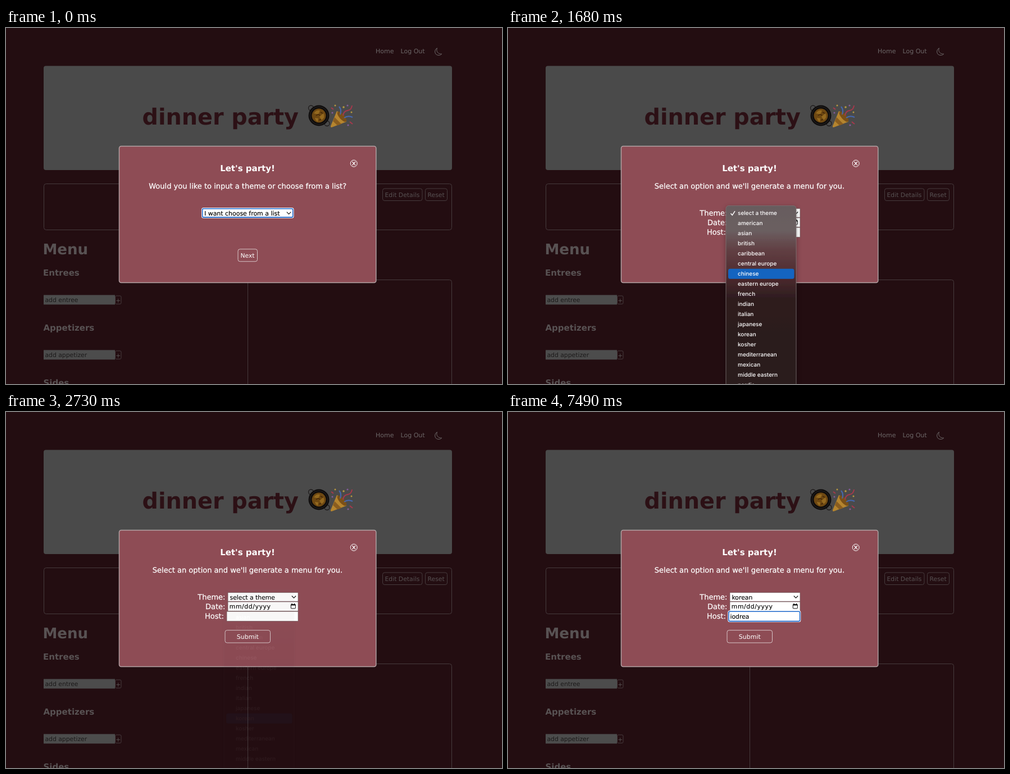
Write an HTML page that moves like this. It is 883 by 634 pixels and loops after 8000 ms.

```html
<!DOCTYPE html>
<html lang="en">
<head>
<meta charset="utf-8">
<title>dinner party</title>
<style>
  html, body { margin: 0; width: 100%; height: 100%; overflow: hidden; background: #230d11; }
  svg { display: block; width: 883px; height: 634px; font: 10.8px "DejaVu Sans", Verdana, sans-serif; text-rendering: geometricPrecision; }
  .bold { font-weight: bold; }
  .mid { text-anchor: middle; }
  .end { text-anchor: end; }
  .line { fill: none; stroke: #463b3d; }
  .page { fill: #585253; }
  .nav { fill: #6c6667; }
  .head { font-size: 15px; }
  .copy { font-size: 13px; stroke: #fff; stroke-width: .25; }
  .input { fill: #fff; stroke: #6f5a5d; stroke-width: .7; }
  .ink { fill: #000; stroke: #000; stroke-width: .15; }
  .list { font: 500 10px Inter, Roboto, sans-serif; fill: #fff; }

  .ask, .form, .menu, .bar, .before, .after, .focus, .typed, .caret, .caret rect {
    animation: 8s step-end infinite;
  }
  .ask { animation-name: ask; }
  .form { animation-name: form; }
  .menu { animation-name: menu; }
  .bar { animation-name: bar; }
  .before { animation-name: before; }
  .after { animation-name: after; }
  .focus { animation-name: focus; }
  .typed { animation-name: type; }
  .caret { animation-name: move; }
  .caret rect { animation-name: blink; }

  @keyframes ask { 0% { opacity: 1 } .875%, 100% { opacity: 0 } }
  @keyframes form { 0% { opacity: 0 } .875%, 100% { opacity: 1 } }
  @keyframes menu {
    0% { opacity: 0 }
    14% { opacity: 1 }
    31.5% { opacity: .94 }
    32.375% { opacity: .65 }
    33.25% { opacity: .3 }
    34.125% { opacity: .05 }
    35%, 100% { opacity: 0 }
  }
  /* one list row is 18px high */
  @keyframes bar {
    0% { transform: none; opacity: 1 }
    19.25% { transform: translateY(36px) }
    20.125% { transform: translateY(72px) }
    21% { transform: translateY(108px) }
    21.875% { transform: translateY(162px) }
    22.75% { transform: translateY(198px) }
    26.25% { transform: translateY(216px); opacity: 1 }
    29.75% { transform: translateY(216px); opacity: 0 }
    30.625%, 100% { transform: translateY(216px); opacity: 1 }
  }
  @keyframes before { 0% { opacity: 1 } 35%, 100% { opacity: 0 } }
  @keyframes after { 0% { opacity: 0 } 35%, 100% { opacity: 1 } }
  @keyframes focus { 0% { opacity: 0 } 46.375%, 100% { opacity: 1 } }
  @keyframes type {
    0% { clip-path: inset(-5px 100% -5px 0) }
    51.625% { clip-path: inset(-5px 31.2px -5px 0) }
    52.5% { clip-path: inset(-5px 24.6px -5px 0) }
    55.125% { clip-path: inset(-5px 17.7px -5px 0) }
    56.875% { clip-path: inset(-5px 13.3px -5px 0) }
    57.75% { clip-path: inset(-5px 6.6px -5px 0) }
    59.5%, 100% { clip-path: inset(-5px) }
  }
  @keyframes move {
    0% { transform: none }
    51.625% { transform: translateX(3px) }
    52.5% { transform: translateX(9.6px) }
    55.125% { transform: translateX(16.5px) }
    56.875% { transform: translateX(20.9px) }
    57.75% { transform: translateX(27.6px) }
    59.5% { transform: translateX(34.2px) }
    87.5%, 100% { transform: translateX(37.6px) }
  }
  @keyframes blink {
    0% { opacity: 1 }
    65.625% { opacity: 0 }
    72.625% { opacity: 1 }
    78.75% { opacity: 0 }
    85.75% { opacity: 1 }
    93.625%, 100% { opacity: 0 }
  }
</style>
</head>
<body>
<svg viewBox="0 0 883 634">
  <defs>
    <linearGradient id="glass" gradientUnits="userSpaceOnUse" x1="0" y1="316" x2="0" y2="634">
      <stop offset="0" stop-color="#665c5d"/>
      <stop offset=".14" stop-color="#6b5f61"/>
      <stop offset=".25" stop-color="#613f43"/>
      <stop offset=".4" stop-color="#4d2a2e"/>
      <stop offset=".52" stop-color="#2e1d1f"/>
      <stop offset="1" stop-color="#291c1d"/>
    </linearGradient>
    <filter id="shade" x="-20%" y="-10%" width="140%" height="120%">
      <feDropShadow dx="0" dy="3" stdDeviation="4" flood-opacity=".35"/>
    </filter>
    <path id="chevron" d="M-3.7-1.8 0 1.9 3.7-1.8" fill="none" stroke="#111" stroke-width="1.1"/>
  </defs>

  <rect width="883" height="634" fill="#230d11"/>

  <!-- navigation and banner -->
  <g class="nav" font-size="11">
    <text x="658" y="45">Home</text>
    <text x="702.5" y="45">Log Out</text>
  </g>
  <path d="M767.5 35.8C762 38.500 762 48.200 770 48.500 772.600 48.500 774.600 47.700 775.800 46.200 768.500 46.500 765.200 41 767.500 35.800Z" fill="none" stroke="#6c6667"/>
  <rect x="67" y="67.500" width="727" height="185.500" rx="4" fill="#4a4a4a"/>
  <text class="bold" x="242.500" y="171.500" font-size="39.700" fill="#2c1015">dinner party</text>

  <!-- pan -->
  <g fill="none" stroke="#1f1c1c" stroke-width="1.300">
    <circle cx="543" cy="142.500" r="4.500"/>
    <circle cx="571.500" cy="170" r="4.500"/>
  </g>
  <circle cx="557" cy="156" r="18.500" fill="#0e0c0c"/>
  <circle cx="557" cy="156" r="15.800" fill="none" stroke="#2a2625"/>
  <circle cx="557" cy="156" r="12.500" fill="#6e4812"/>
  <path d="M548 152q5-7 11-5l-3 7zM558 158l7-6q4 7-3 12zM550 160l6 1-1 6q-4-2-5-7z" fill="#94691f"/>
  <path d="M552 156q4-4 7 0M560 150l4 2M557 164l4-1" stroke="#452808" stroke-width="1.500" fill="none"/>

  <!-- popper -->
  <path d="M578 174.500 589 148Q605 155 606 167L581 176.500Q577 178 578 174.500Z" fill="#b5852f"/>
  <path d="M585 159 597 171 590 173.500 582 166Z" fill="#8a5d1f"/>
  <ellipse cx="598" cy="158" rx="4.500" ry="11.500" transform="rotate(-42 598 158)" fill="#7a5018"/>
  <g fill="none" stroke-width="2">
    <path d="M595 154q3-8-2-14" stroke="#4668b0"/>
    <path d="M600 156q1-8 8-9t8-9" stroke="#a8384c"/>
    <path d="M602 160q7-5 15-1" stroke="#4668b0"/>
    <path d="M579 142l4 3M612 167l5 4" stroke="#a8384c"/>
  </g>
  <g fill="#b59840">
    <circle cx="601" cy="141" r="1.800"/>
    <circle cx="615" cy="150" r="1.500"/>
    <circle cx="586" cy="138" r="1.500"/>
  </g>
  <g fill="#835a9c">
    <circle cx="608" cy="138" r="1.600"/>
    <circle cx="581" cy="151" r="1.500"/>
    <circle cx="609" cy="173" r="1.600"/>
  </g>

  <!-- page body -->
  <g class="line">
    <rect x="67.500" y="277.500" width="726" height="82" rx="4"/>
    <rect x="430.500" y="448.500" width="363" height="200" rx="4"/>
    <rect x="670.500" y="286" width="70.500" height="21.500" rx="3.500"/>
    <rect x="746.500" y="286" width="39" height="21.500" rx="3.500"/>
    <rect x="194.500" y="477" width="10.500" height="14.500" rx="2"/>
    <rect x="194.500" y="575" width="10.500" height="14.500" rx="2"/>
  </g>
  <g class="page">
    <text x="674.500" y="301">Edit Details</text>
    <text x="750.500" y="301">Reset</text>
    <text class="bold" x="65.500" y="403" font-size="26">Menu</text>
    <g class="bold head">
      <text x="66" y="441">Entrees</text>
      <text x="66.500" y="539">Appetizers</text>
      <text x="66.500" y="637">Sides</text>
    </g>
    <text class="mid" x="199.800" y="488.500">+</text>
    <text class="mid" x="199.800" y="586.500">+</text>
  </g>
  <g fill="#4c4c4c">
    <rect x="67" y="475.500" width="127" height="17"/>
    <rect x="67" y="573.500" width="127" height="17"/>
  </g>
  <g fill="#1c1a1a">
    <text x="69.500" y="488">add entree</text>
    <text x="69.500" y="586">add appetizer</text>
  </g>

  <!-- dialog -->
  <rect x="201.500" y="210.500" width="457.300" height="243" rx="3.500" fill="#8e4c55" stroke="#b3a3a5" stroke-width="1.500"/>
  <g fill="#fff">
    <text class="bold mid head" x="430" y="254.500">Let's party!</text>
    <circle cx="619.200" cy="241.200" r="6" fill="none" stroke="#fff"/>
    <path d="M616.500 238 622 244.400M622 238 616.500 244.400" stroke="#fff" stroke-width="1.200"/>
  </g>

  <g class="ask">
    <text class="mid copy" x="430.200" y="286" fill="#fff">Would you like to input a theme or choose from a list?</text>
    <rect x="348" y="320" width="164.500" height="18.800" rx="3.500" fill="#fff"/>
    <rect x="349.700" y="321.700" width="161" height="15.400" rx="2" fill="#fff" stroke="#1b66c9" stroke-width="1.600"/>
    <text class="ink" x="353" y="333.500" font-size="10.950">I want choose from a list</text>
    <use href="#chevron" x="503.500" y="329.500"/>
    <rect x="413" y="393.800" width="34.500" height="22" rx="3.500" fill="none" stroke="#d8c6c8"/>
    <text class="mid" x="430" y="409" fill="#fff">Next</text>
  </g>

  <g class="form">
    <g fill="#fff">
      <text class="mid copy" x="430" y="286">Select an option and we'll generate a menu for you.</text>
      <g class="end copy">
        <text x="390.500" y="333.700">Theme:</text>
        <text x="390.500" y="350.900">Date:</text>
        <text x="388" y="368.400">Host:</text>
      </g>
      <text class="mid" x="430.300" y="404" font-size="11">Submit</text>
    </g>
    <rect x="390" y="388.700" width="80.500" height="22.300" rx="3.500" fill="none" stroke="#d8c6c8"/>
    <rect class="input" x="395" y="321.700" width="125" height="15.500"/>
    <rect class="input" x="395" y="338" width="125" height="16.500"/>
    <rect class="input" x="393" y="355.200" width="127" height="17.300"/>
    <text class="ink before" x="398.500" y="333.500">select a theme</text>
    <text class="ink after" x="398.500" y="333.500">korean</text>
    <text class="ink" x="397.800" y="350.300" letter-spacing=".6">mm/dd/yyyy</text>
    <use href="#chevron" x="512.500" y="329.300"/>
    <rect x="507.300" y="342.600" width="8" height="7.400" rx=".8" fill="none" stroke="#111"/>
    <path d="M507 343.700h8.600M509 341v2M513.600 341v2" stroke="#111" stroke-width="1.500"/>

    <g class="focus">
      <rect x="391.300" y="353.600" width="130" height="20.700" rx="3.500" fill="#fff"/>
      <rect x="393" y="355.300" width="126.600" height="17.300" rx="2" fill="#fff" stroke="#1b66c9" stroke-width="1.600"/>
      <text class="ink typed" x="395.500" y="368">iodrea</text>
      <g class="caret"><rect x="395.300" y="358" width="1" height="13"/></g>
    </g>
  </g>

  <!-- drop-down -->
  <g class="menu">
    <rect x="388" y="316.500" width="125" height="340" rx="5" fill="url(#glass)" stroke="#7d7172" stroke-width=".8" filter="url(#shade)"/>
    <rect class="bar" x="392" y="320.700" width="117.500" height="18" rx="3.500" fill="#1464c0"/>
    <path d="M396.500 330.200 399.300 333.300 404 326.200" fill="none" stroke="#fff" stroke-width="1.500"/>
    <g class="list" id="rows"></g>
  </g>
</svg>
<script>
  const themes = ["select a theme", "american", "asian", "british", "caribbean", "central europe",
    "chinese", "eastern europe", "french", "indian", "italian", "japanese", "korean", "kosher",
    "mediterranean", "mexican", "middle eastern", "nordic"];
  document.getElementById("rows").innerHTML = themes
    .map((name, i) => `<text x="409" y="${333.2 + 18 * i}">${name}</text>`).join("");
</script>
</body>
</html>
```
